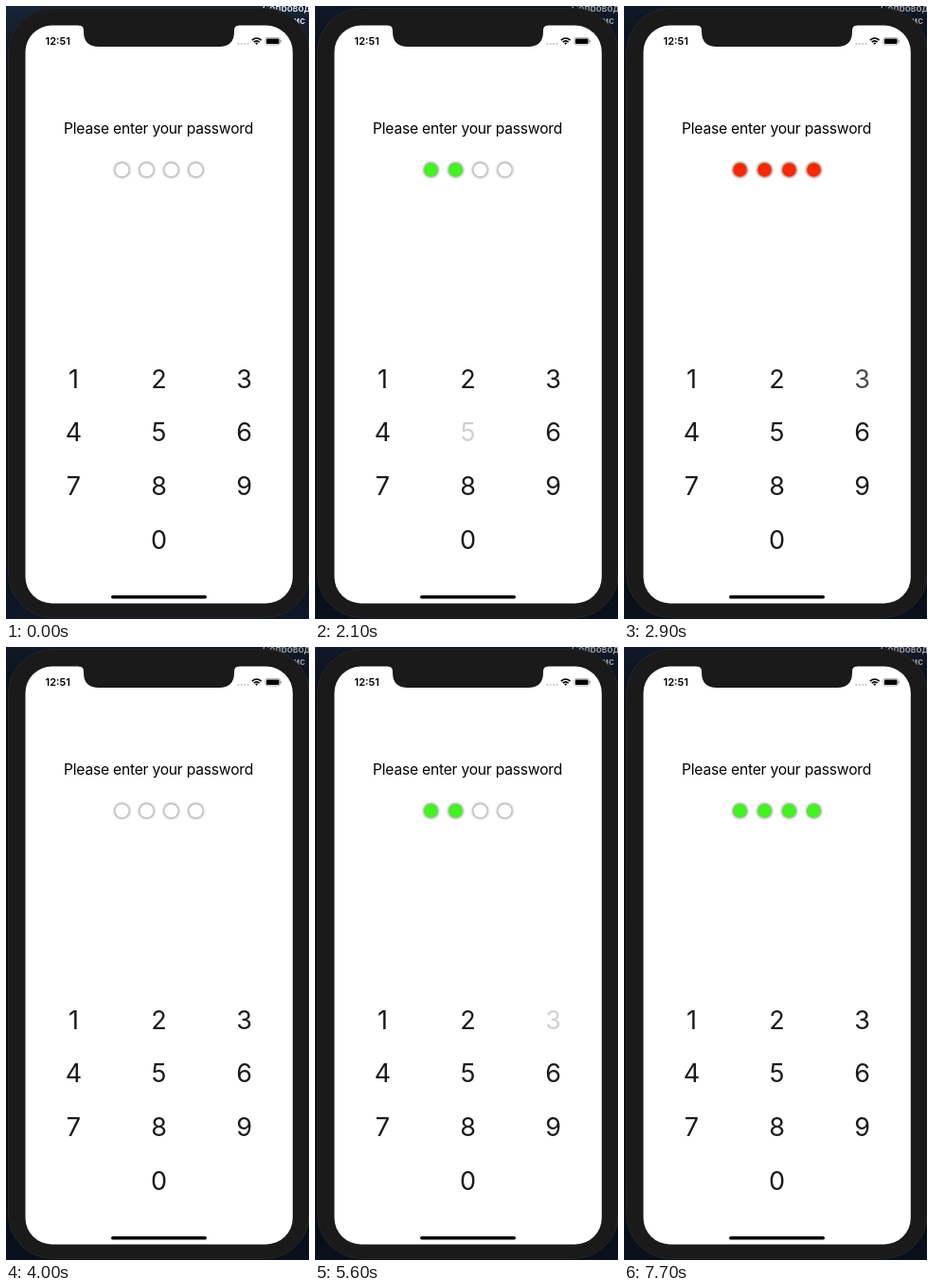
Write an HTML page that moves like this. It is 320x648 px and loops after 8000 ms.

```html
<!DOCTYPE html>
<html lang="en">
<head>
<meta charset="utf-8">
<title>Password entry</title>
<style>
html, body { margin: 0; width: 100%; height: 100%; overflow: hidden; background: #0a0d14; }
svg { display: block; width: 100%; height: 100%; }
text { font-family: Inter, Roboto, "Liberation Sans", sans-serif; }
#keys text { font-size: 27px; text-anchor: middle; fill: #1b1b1b; }
</style>
</head>
<body>
<svg viewBox="0 0 320 648" preserveAspectRatio="none">
  <defs>
    <linearGradient id="desk" x2="0" y2="1">
      <stop offset="0" stop-color="#17243a"/>
      <stop offset=".12" stop-color="#0e1118"/>
      <stop offset=".85" stop-color="#0b0d13"/>
      <stop offset="1" stop-color="#0e182a"/>
    </linearGradient>
    <filter id="soft" x="-50%" y="-50%" width="200%" height="200%" color-interpolation-filters="sRGB">
      <feGaussianBlur stdDeviation=".8"/>
    </filter>
  </defs>

  <rect width="320" height="648" fill="url(#desk)"/>
  <g fill="#e4e7ec" font-size="10" font-weight="600">
    <text x="271" y="6">Сопровод</text>
    <text x="298" y="18.5">пис</text>
  </g>
  <rect id="shade" width="320" height="648" opacity="0"/>

  <rect x="2.5" y="2.5" width="318" height="644" rx="47" fill="#1a1a1a" stroke="#262626"/>
  <rect x="20.5" y="20.5" width="282.3" height="611" rx="28" fill="#fff"/>
  <path d="M77 19.5V20.5Q82 20.5 82 26V27Q82 43 98 43H225Q241 43 241 27V26Q241 20.5 246 20.5V19.5Z" fill="#1a1a1a"/>

  <text x="41.5" y="41" font-size="11" font-weight="600">12:51</text>
  <path d="M244.5 40H257" stroke="#b5b5b5" stroke-width="1.5" stroke-dasharray="1.7 1.7"/>
  <g fill="none" stroke="#000" stroke-width="1.6">
    <path d="M259.8 36.2Q264.7 31.8 269.6 36.2M261.7 38.2Q264.7 35.5 267.7 38.2"/>
    <path d="M263.2 39.2L264.7 41L266.2 39.2Q264.7 38 263.2 39.2Z" fill="#000" stroke="none"/>
  </g>
  <rect x="273.9" y="33.4" width="15.6" height="7.6" rx="2.2" fill="none" stroke="#a0a0a0" stroke-width=".8"/>
  <rect x="274.9" y="34.4" width="13.6" height="5.6" rx="1.3"/>
  <path d="M290.4 36V38.4" stroke="#a0a0a0"/>

  <text x="61" y="134.7" font-size="15.6" letter-spacing="-.2">Please enter your password</text>
  <g id="dots"></g>
  <g id="keys"></g>
  <rect x="111" y="623" width="101" height="3.4" rx="1.7"/>
</svg>
<script>
const LOOP = 8000, STEP = 100, FADE = 300, CLEAR = 3700;
// touch-down time, key, time held
const presses = [
  [700, 1, 100], [1500, 2, 100], [2100, 5, 100], [2600, 3, 100],
  [4300, 1, 200], [5000, 2, 200], [5600, 3, 100], [6400, 4, 100]
];
const $ = id => document.getElementById(id);

function add(parent, tag, attrs, label = '') {
  const el = document.createElementNS('http://www.w3.org/2000/svg', tag);
  for (const name in attrs) el.setAttribute(name, attrs[name]);
  el.textContent = label;
  return parent.appendChild(el);
}

const dots = [0, 1, 2, 3].map(i => {
  const cx = 122.5 + 26 * i, cy = 173.2;
  return {
    rim: add($('dots'), 'circle', { cx, cy, r: 8.5, filter: 'url(#soft)' }),
    core: add($('dots'), 'circle', { cx, cy, r: 7 })
  };
});

const keys = [];
for (const n of [1, 2, 3, 4, 5, 6, 7, 8, 9, 0]) {
  const cell = n ? n - 1 : 10;
  keys[n] = add($('keys'), 'text', {
    x: 71.5 + 90 * (cell % 3),
    y: 403.5 + 56.7 * Math.floor(cell / 3)
  }, n);
}

const clamp = v => Math.max(0, Math.min(1, v));
const ease = v => v * v * (3 - 2 * v);

function draw(time) {
  const t = Math.floor(time / STEP) * STEP;
  const alpha = Array(10).fill(1);
  let filled = 0;
  for (const [down, key, held] of presses) {
    const up = down + held;
    if (t >= down && t < up + FADE) alpha[key] = 0.2 + 0.8 * ease(clamp((t - up) / FADE));
    if (t >= up && (t < CLEAR || down > CLEAR)) filled++;
  }
  keys.forEach((el, n) => el.setAttribute('opacity', alpha[n]));

  const wrong = filled === 4 && t < CLEAR;
  dots.forEach(({ rim, core }, i) => {
    core.setAttribute('fill', wrong ? '#ff2600' : i < filled ? '#3ff51c' : '#fff');
    core.setAttribute('r', i < filled ? 7.2 : 7);
    rim.setAttribute('fill', wrong ? '#a58a84' : '#a8a8a8');
  });
  $('shade').setAttribute('opacity', 0.3 * clamp((t - 600) / 500));
}

function frame() {
  draw(performance.now() % LOOP);
  requestAnimationFrame(frame);
}
frame();
</script>
</body>
</html>
```
